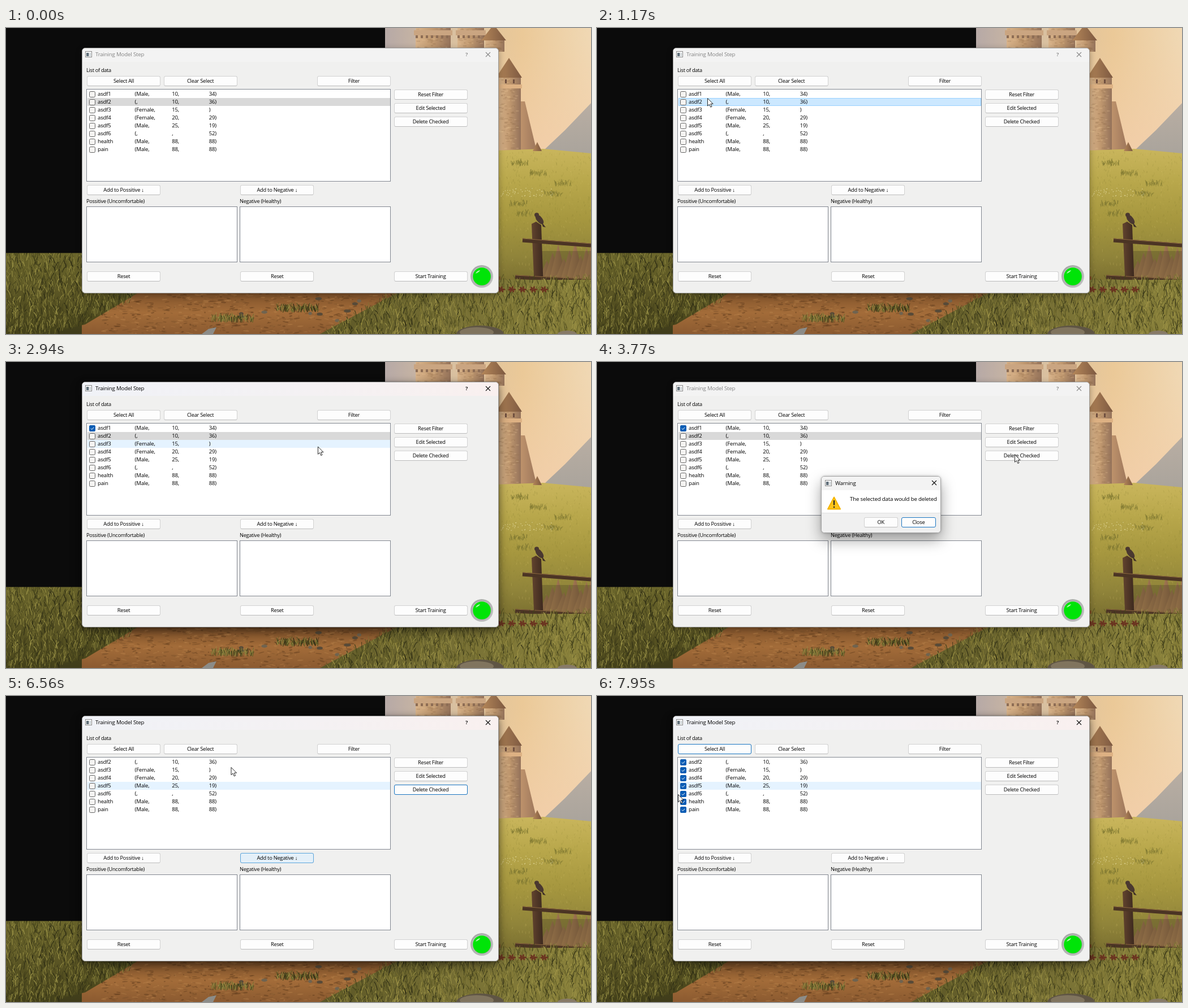
Animation, 1034 px wide and 542 px high, one loop 8 s. Source, as an HTML page with a canvas:

```html
<!DOCTYPE html>
<html lang="en">
<head>
<meta charset="utf-8">
<title>Training Model Step</title>
<style>
html, body { margin: 0; width: 100%; height: 100%; overflow: hidden; background: #0b0b0b; }
#stage { position: absolute; left: 0; top: 0; width: 1034px; height: 542px; overflow: hidden; }
#stage * { position: absolute; box-sizing: border-box; }
div { font-family: "Open Sans", "Noto Sans", sans-serif; white-space: pre; color: #000; }
.win { border-radius: 6px; background: #f0f0ef; border: 1px solid #9a9a99; box-shadow: 0 3px 12px rgba(0,0,0,.32); }
.lift { border-radius: 6px; box-shadow: 0 8px 20px rgba(0,0,0,.34), 0 0 3px rgba(0,0,0,.3); }
.bar { border-radius: 5px 5px 0 0; background: #f3f3f3; }
.bar.on { background: linear-gradient(90deg, #f0f2f7, #f4f1f3 55%, #f9f0ef); }
.title { font-size: 9.7px; letter-spacing: -.18px; }
.off { color: #838383; }
.label { font-size: 9.2px; letter-spacing: -.28px; }
.cell { font-size: 9.6px; letter-spacing: -.2px; }
.btn { font-size: 9.3px; letter-spacing: -.26px; text-align: center; background: #fdfdfd; border: 1px solid #d2d2d2; border-bottom-color: #bbb; border-radius: 3px; }
.hot { background: #e4f0f9; border-color: #5ba5dc; }
.focus { border-color: #1a75c1; }
.list { background: #fff; border: 1px solid #828790; }
.sel { background: #d9d9d9; }
.hover { background: #e5f3ff; }
.selhover { background: #cce8ff; border: 1px solid #99d1ff; }
.check { background: #f5f4f2; border: 1px solid #606060; border-radius: 2.5px; }
.ring { border-radius: 50%; background: #ffe000; }
.dlg { border: 1px solid #a2a2a2; background: #fff; border-radius: 6px; box-shadow: 0 12px 26px rgba(0,0,0,.36), 0 0 4px rgba(0,0,0,.2); }
.foot { background: #f0f0f0; border-top: 1px solid #e0e0e0; border-radius: 0 0 6px 6px; }
svg { overflow: visible; }
</style>
</head>
<body>
<div id="stage"><canvas id="scene" width="1034" height="542" style="left:0;top:0"></canvas></div>
<script>
const D = 8000, stage = document.getElementById('stage');

// ---------- wallpaper ----------
const g = document.getElementById('scene').getContext('2d');
let seed = 11;
const rnd = (a, b) => a + (b - a) * (seed = seed * 16807 % 2147483647) / 2147483647;
const pick = list => list[Math.floor(rnd(0, list.length))];
const repeat = (n, fn) => { for (let i = 0; i < n; i++) fn(i); };
function ramp(x0, y0, x1, y1, ...cols) {
  const q = g.createLinearGradient(x0, y0, x1, y1);
  cols.forEach((c, i) => q.addColorStop(i / (cols.length - 1), c));
  return q;
}
const across = (x0, x1, ...cols) => ramp(x0, 0, x1, 0, ...cols);
const down = (y0, y1, ...cols) => ramp(0, y0, 0, y1, ...cols);
function rect(c, x, y, w, h) { g.fillStyle = c; g.fillRect(x, y, w, h); }
function poly(c, ...p) {
  g.fillStyle = c;
  g.beginPath();
  for (let i = 0; i < p.length; i += 2) g.lineTo(p[i], p[i + 1]);
  g.fill();
}
function oval(c, x, y, rx, ry, turn = 0) {
  g.fillStyle = c;
  g.beginPath();
  g.ellipse(x, y, rx, ry, turn, 0, 7);
  g.fill();
}
function line(c, w, x0, y0, x1, y1) {
  g.strokeStyle = c; g.lineWidth = w;
  g.beginPath(); g.moveTo(x0, y0); g.lineTo(x1, y1); g.stroke();
}
function grass(n, x0, x1, y0, y1, len, cols, inside = () => true) {
  repeat(n, i => {
    const x = rnd(x0, x1), y = y0 + (y1 - y0) * i / n, h = rnd(.4, 1) * len, lean = rnd(-.4, .4) * len;
    if (!inside(x, y)) return;
    g.strokeStyle = pick(cols); g.lineWidth = rnd(.5, 1.3);
    g.beginPath(); g.moveTo(x, y);
    g.quadraticCurveTo(x + lean * .2, y - h * .6, x + lean, y - h);
    g.stroke();
  });
}
function tower(x, y, w, h) {
  rect(across(x, x + w, '#d9b48b', '#c0986f', '#94725a'), x, y, w, h);
  repeat(w * h / 45, () => rect(pick(['#8d684833', '#f3cfa033', '#7a563b33']), rnd(x, x + w - 7), rnd(y, y + h), rnd(3, 7), 2));
}
function roof(x, top, base, half) {
  poly(across(x - half, x + half, '#b58759', '#7d5941'), x, top, x + half, base, x - half, base);
}

// sky and castle
rect(across(670, 1034, '#b6a9a6', '#d9c0a0', '#ebc998', '#f0d8b4'), 670, 0, 364, 260);
rect(down(20, 220, '#f2cfa500', '#f3ceabcc'), 860, 0, 174, 240);
for (const [x, w] of [[724, 62], [798, 47]]) {
  tower(x, 0, w, 40);
  rect('#caa581', x - 3, 4, w + 6, 9);
  repeat(w / 9, i => rect('#8d6d55', x + 9 * i, 13, 4, 5));
}
tower(847, 18, 34, 24);
roof(862, -6, 22, 22);
poly(across(866, 938, '#dbb387', '#c79a70', '#9c765b'), 866, 130, 917, 130, 938, 218, 866, 218);
tower(870, 84, 40, 134);
roof(889, 53, 88, 23);
rect('#ddb183', 868, 100, 44, 7);
repeat(2, i => rect('#705040', 882 + 14 * i, 91, 3, 7));

// hills
poly(down(132, 222, '#b9aea3', '#aaa49c'), 1034, 133, 988, 181, 950, 217, 1034, 226);
poly(down(208, 470, '#cbb75e', '#b8a74b', '#a6973f', '#90843a', '#70662c'), 866, 217, 950, 214, 1034, 222, 1034, 480, 866, 480);
grass(700, 868, 1034, 222, 440, 5, ['#8f873944', '#d3c16a44', '#7f792f44']);
roof(939, 202, 218, 8);
repeat(6, i => {
  const x = rnd(885, 1020), y = 242 + 18 * i;
  grass(45, x - 15, x + 15, y - 3, y + 3, 8, ['#6d692baa', '#827b32aa', '#968c3eaa']);
});
repeat(55, () => oval('#e6dda2aa', rnd(872, 970), rnd(283, 299), .9, .8));

// trees, fence and bird
repeat(9, i => roof(956 + i * 10, 412 - (i % 3) * 13 - i * 1.5, 447, 16));
rect('#4d432655', 945, 395, 89, 52);
poly(across(928, 950, '#64452f', '#3b281e'), 929, 347, 937, 343, 946, 349, 950, 462, 934, 462);
for (const [x, y, drop] of [[913, 376, 9], [900, 441, 7]]) {
  line('#4b3424', 7, x, y, 1034, y + drop);
  line('#8b673f', 1.2, x, y - 3, 1034, y + drop - 3);
}
oval('#4a3830', 943, 339, 10, 5, .9);
oval('#4a3830', 938, 331, 4, 3.7);
poly('#3e2e28', 946, 343, 954, 353, 949, 352);

// foreground
const dark = ['#2f2e15', '#45431c', '#5f5b26', '#7c7535', '#989046'];
const light = ['#4d4b20', '#6a6429', '#857b36', '#a09548'];
rect(down(398, 542, '#6b662b', '#514d20', '#3f3c1a'), 0, 398, 300, 144);
rect(down(466, 542, '#7d5029', '#a36c39', '#8b5a30'), 134, 440, 740, 102);
repeat(700, () => oval(pick(['#5c391c77', '#c08a5055', '#79502b66']), rnd(170, 690), rnd(470, 542), rnd(1, 6), rnd(.5, 1.5), rnd(-.3, .3)));
repeat(10, () => oval(pick(['#6f6350', '#574a38']), rnd(330, 640), rnd(476, 520), rnd(3, 7), 2.8));
poly(down(398, 542, '#6b662b', '#5a5524', '#434019'), 0, 398, 140, 398, 232, 470, 140, 525, 70, 542, 0, 542);
poly(across(560, 1034, '#5b5626', '#777035', '#8b833c'), 866, 446, 1034, 446, 1034, 542, 555, 542, 690, 470, 866, 466);
grass(1700, 0, 225, 402, 550, 16, dark, (x, y) => x < 240 - Math.max(0, y - 478) * 2.2);
grass(2400, 560, 1034, 450, 554, 17, light.concat(dark), (x, y) => x > 700 - (y - 468) * 1.8);
for (const [x, y] of [[400, 519], [515, 501]]) grass(130, x - 37, x + 37, y - 4, y + 3, 12, dark);
oval('#5f5544', 838, 542, 42, 15);
oval('#80745e', 832, 539, 30, 9);
oval('#877a67', 992, 542, 17, 6);
poly('#8c8c88', 346, 542, 358, 533, 372, 530, 366, 542);
repeat(5, i => repeat(6, a => oval('#6b3220', 875 + 19 * i + 4 * Math.cos(a), 463 + 3 * Math.sin(a), 3, 1.5, a)));
rect('#0b0b0b', 0, 0, 670, 398.5);

// ---------- interface helpers ----------
function box(cls, x, y, w, h, text = '', parent = stage) {
  const el = document.createElement('div');
  el.className = cls;
  Object.assign(el.style, { left: x + 'px', top: y + 'px', width: w + 'px', height: h + 'px' });
  el.style.lineHeight = h - (cls.startsWith('btn') ? 2 : 0) + 'px';
  el.textContent = text;
  parent.append(el);
  return el;
}
function art(x, y, inner, parent = stage) {
  const el = box('', x, y, 1, 1, '', parent);
  el.innerHTML = `<svg width="1" height="1" style="left:0;top:0">${inner}</svg>`;
  return el;
}
const timed = [];
const show = (el, from, to) => timed.push({ el, when: t => t >= from && t < to });
const cross = c => `<path d="M-4-4 4 4M4-4-4 4" stroke="${c}" stroke-width="1.1"/>`;
const appIcon = `<rect x=".5" y=".5" width="11" height="10" fill="#f8f8f8" stroke="#8b8b8b"/>
  <rect x="2" y="3" width="4.5" height="6" fill="#5f6e79"/><rect x="8" y="3" width="2" height="6" fill="#c9d0d4"/>`;

// ---------- event times ----------
const T = { activate: 2320, check: 2390, enter: 3150, warn: 3690, close: 4960, remove: 5270, select: 7300, checkAll: 7400 };
const clicks = [T.activate, T.warn - 70, T.close - 160, T.select - 50];
const isActive = t => t >= T.activate && t < T.warn || t >= T.close + 30;

// ---------- main window ----------
timed.push({ el: box('lift', 134, 35, 737, 435), when: isActive });
box('win', 134, 35, 737, 435);
function titleBar(on) {
  const bar = box('', 135, 36, 735, 24), ink = on ? '#111' : '#8a8a8a', tone = on ? '' : ' off';
  box('bar' + (on ? ' on' : ''), 0, 0, 735, 24, '', bar);
  art(5, 5, appIcon, bar);
  box('title' + tone, 23, 2, 120, 18, 'Training Model Step', bar);
  box('title' + tone, 677, 2, 12, 18, '?', bar).style.fontWeight = 600;
  art(717, 11, cross(ink), bar);
  return bar;
}
titleBar(false);
timed.push({ el: titleBar(true), when: isActive });

box('label', 142, 68, 140, 14, 'List of data');
box('label', 142, 300, 140, 14, 'Possitive (Uncomfortable)');
box('label', 413, 300, 140, 14, 'Negative (Healthy)');

const button = (col, y, text, cls = '') => box('btn ' + cls, 143 + 135.65 * col, y, 130, 18, text);
const selectAll = [0, 85, 'Select All'], remove = [4, 156.5, 'Delete Checked'], negative = [2, 277.5, 'Add to Negative ↓'];
const buttons = [
  selectAll, [1, 85, 'Clear Select'], [3, 85, 'Filter'], [4, 109, 'Reset Filter'], [4, 132.5, 'Edit Selected'], remove,
  [0, 277.5, 'Add to Possitive ↓'], negative, [0, 431, 'Reset'], [2, 431, 'Reset'], [4, 431, 'Start Training']
];
buttons.forEach(b => button(...b));
show(button(...remove, 'hot'), T.enter, T.warn);
show(button(...remove, 'focus'), T.remove, T.select);
show(button(...negative, 'hot'), T.remove, 6770);
show(button(...selectAll, 'hot'), 6900, T.select);
show(button(...selectAll, 'focus'), T.select, D);

box('list', 142, 108, 538, 164);
box('list', 142, 316, 267, 99);
box('list', 413, 316, 267, 99);

// ---------- data rows ----------
const rowY = i => 110 + 14 * i;
const strip = cls => box(cls, 144, rowY(1), 535, 14);
show(strip('sel'), 0, T.remove);
const hover = strip('hover');

const data = `asdf1|(Male,|10,|34)
asdf2|(,|10,|36)
asdf3|(Female,|15,|)
asdf4|(Female,|20,|29)
asdf5|(Male,|25,|19)
asdf6|(,|,|52)
health|(Male,|88,|88)
pain|(Male,|88,|88)`.split('\n').map(s => s.split('|'));
const tick = `<rect width="11" height="11" rx="2.5" fill="#0b5db5"/>
  <path d="M2.8 5.6 4.7 7.5 8.3 3.8" fill="none" stroke="#fff"/>`;
function rows(items) {
  const group = box('', 0, 0, 1, 1);
  items.forEach((row, i) => {
    box('check', 146.5, rowY(i) + 1.5, 11, 11, '', group);
    row.forEach((s, k) => box('cell', 162 + 65.6 * k, rowY(i), 60, 14, s, group));
  });
  return group;
}
show(rows(data), 0, T.remove);
show(rows(data.slice(1)), T.remove, D);
const checkMark = i => art(146.5, rowY(i) + 1.5, tick);
show(checkMark(0), T.check, T.remove);
repeat(data.length - 1, i => show(checkMark(i), T.checkAll, D));

// status lamp
art(841, 439.5, `<defs>
  <linearGradient id="rim" x2="1" y2="1"><stop stop-color="#a3a3a3"/><stop offset="1" stop-color="#c4c4c4"/></linearGradient>
  <linearGradient id="rim2" x2="1" y2="1"><stop stop-color="#c8c8c8"/><stop offset="1" stop-color="#a0a0a0"/></linearGradient></defs>
  <circle r="20" fill="url(#rim)"/><circle r="17" fill="url(#rim2)"/><circle r="15.8" fill="#00e408"/>
  <path d="M-11-5Q-9-10-3-11Q-4-8-11-5Z" fill="#d8ffd8" opacity=".85"/>`);

// ---------- warning dialog ----------
const dialog = box('', 396, 202, 212, 101);
box('dlg', 0, 0, 212, 101, '', dlg = dialog);
box('bar', 1, 1, 210, 24, '', dialog);
art(7, 7, appIcon, dialog);
box('title', 25, 4, 60, 18, 'Warning', dialog);
art(199.5, 12, cross('#111'), dialog);
art(11, 36, `<path d="M12 1.5 23 22.5H1Z" fill="#ffc51b" stroke="#f5b400" stroke-width="2" stroke-linejoin="round"/>
  <path d="M12 7v8.5M12 17.8v2.4" stroke="#222" stroke-width="2.2"/>`, dialog);
box('title', 51, 32, 158, 18, 'The selected data would be deleted', dialog);
box('foot', 1, 65, 210, 35, '', dialog);
box('btn', 75.5, 73, 60.5, 18, 'OK', dialog);
box('btn focus', 142, 73, 60.5, 18, 'Close', dialog);

// ---------- pointer ----------
const ring = box('ring', -10, -10, 20, 20);
const pointer = art(0, 0, `<path d="M0 0V13.4L3.1 10.6 5.3 15.6 7.5 14.6 5.4 9.8H9.6Z" fill="#fff" stroke="#111" stroke-width=".9" stroke-linejoin="round"/>`);
const clamp = v => Math.min(1, Math.max(0, v));
const linear = p => p, smooth = p => p * p * (3 - 2 * p), easeIn = p => p ** 1.5, easeOut = p => 1 - (1 - p) ** 1.6;
// start, end, x, y, easing
const moves = [
  [70, 890, 228, 160, easeOut], [890, 1170, 195.5, 124.6, linear], [1170, 1520, 152, 120, smooth],
  [2430, 3250, 738.5, 164, smooth], [3800, 4560, 493.5, 287, smooth],
  [5820, 6560, 398.5, 126.5, easeIn], [6560, 7120, 215, 95, easeOut], [7420, 7950, 143.5, 174.5, smooth]
];
function pointerAt(t) {
  let x = 1018, y = 521;
  for (const [a, b, tx, ty, ease] of moves) {
    const p = ease(clamp((t - a) / (b - a)));
    x += (tx - x) * p;
    y += (ty - y) * p;
  }
  return [x, y];
}
const place = (el, x, y, s = 1) => el.style.transform = `translate(${x}px, ${y}px) scale(${s})`;

function hoverRow(t, x, y) {
  if (t > 6370) return 3;
  const row = Math.floor((y - rowY(0)) / 14);
  return t < T.warn && x > 143 && x < 680 && row >= 0 && row < data.length ? row : -1;
}

function draw(t) {
  for (const { el, when } of timed) el.style.visibility = when(t) ? 'visible' : 'hidden';

  const [x, y] = pointerAt(t);
  place(pointer, x, y);
  pointer.style.visibility = t < 70 ? 'hidden' : 'visible';

  const row = hoverRow(t, x, y);
  hover.className = row === 1 ? 'selhover' : 'hover';
  hover.style.visibility = row < 0 ? 'hidden' : 'visible';
  hover.style.top = rowY(row) + 'px';

  const click = clicks.find(c => t >= c && t < c + 140);
  const age = click === undefined ? 1 : (t - click) / 140;
  ring.style.opacity = .68 * (1 - age * age);
  place(ring, x, y + 1, .95 + .1 * age);

  const open = clamp((t - T.warn) / 75) * clamp(1 - (t - T.close) / 90);
  dialog.style.opacity = open;
  place(dialog, 0, 0, .92 + .08 * open);
}
function frame() {
  draw(performance.now() % D);
  requestAnimationFrame(frame);
}
var dlg;
frame();
</script>
</body>
</html>
```
